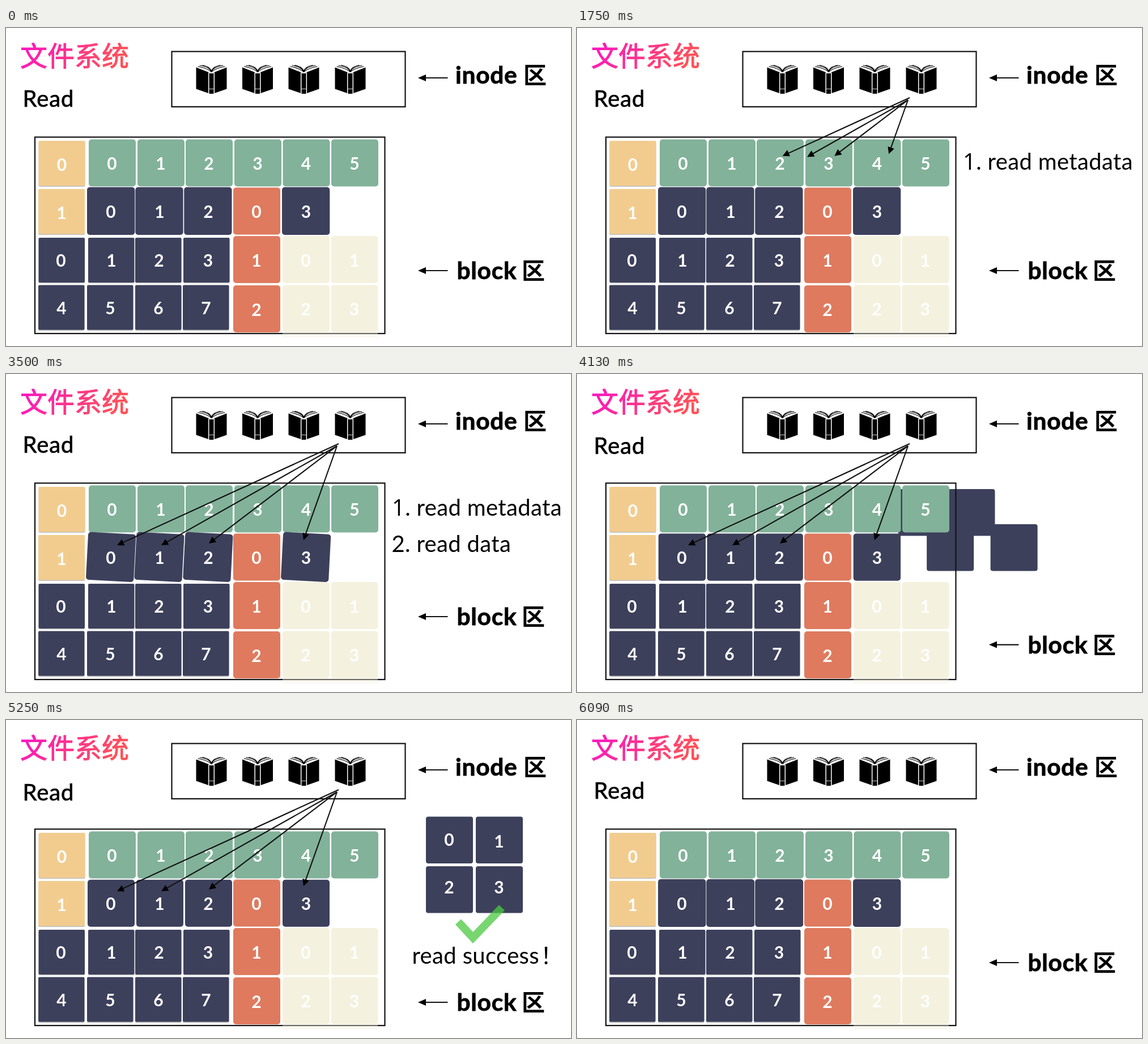
An HTML page that plays this animation: 997x561 px, repeating every 6160 ms.

```html
<!DOCTYPE html>
<html lang="zh-CN">
<head>
<meta charset="utf-8">
<title>文件系统</title>
<style>
html, body { margin: 0; width: 100%; height: 100%; overflow: hidden; background: #fff; }
svg { display: block; width: 100vw; height: 100vh; }
text { font-family: Lato, "Noto Sans CJK SC", sans-serif; }
.note { font-size: 40px; letter-spacing: .35px; }
.one { font-family: "Open Sans", sans-serif; }
.mark { font-family: "Noto Sans CJK JP", "Noto Sans CJK SC", sans-serif; }
.label { font-size: 42.5px; font-weight: 700; letter-spacing: .7px; stroke: #000; stroke-width: .8px; }
.cjk { font-family: "Noto Sans CJK SC", sans-serif; font-size: 41px; font-weight: 700; }
.title { font-family: "Noto Sans CJK SC", sans-serif; font-size: 48px; font-weight: 500; fill: url(#pink); stroke: url(#pink); stroke-width: 1px; }
.digit { font-size: 30px; font-weight: 700; fill: #fff; text-anchor: middle; }
.frame { fill: none; stroke: #111; stroke-width: 2.2px; }
.line { stroke: #111; stroke-width: 2.1px; fill: none; }
</style>
</head>
<body>
<svg viewBox="0 0 997 561" preserveAspectRatio="none">
  <defs>
    <linearGradient id="pink" x1="0" y1="0" x2="1" y2=".25">
      <stop offset="0" stop-color="#fb10cc"/>
      <stop offset="1" stop-color="#ff5058"/>
    </linearGradient>
    <g id="book">
      <path d="M-27-21L-4-12V25L-27 17ZM27-21L4-12V25L27 17ZM-4-10.5H4V25.5H-4Z"/>
      <path d="M-24-22.5Q-8-20 0-13Q8-20 24-22.5M-21-24.5Q-6-23 0-14Q6-23 21-24.5M-16-25Q-4-23 0-15Q4-23 16-25"
        fill="none" stroke="#000" stroke-width="1.2"/>
      <path d="M-4.8-12V25.5M4.8-12V25.5" stroke="#fff" stroke-width="1.5"/>
      <path d="M-4 17H4" stroke="#fff" stroke-width=".8"/>
    </g>
    <g id="pointer">
      <path class="line" d="M738 0H779.500"/>
      <path d="M727 0L741-6V6Z"/>
    </g>
  </defs>

  <text class="title" x="25" y="67">文件系统</text>
  <text id="read" x="29.500" y="138.500" font-size="40" letter-spacing=".9" stroke="#000" stroke-width=".7">Read</text>

  <g id="copies"></g>
  <g id="grid"></g>
  <rect class="frame" x="51" y="192.500" width="617.500" height="346.500"/>
  <rect x="488" y="537" width="168" height="9" fill="#f4f1de" opacity=".4"/>
  <g id="homes"></g>

  <rect class="frame" x="292.500" y="41.500" width="412" height="97.500"/>
  <use href="#book" x="362.500" y="90.500"/>
  <use href="#book" x="444" y="90.500"/>
  <use href="#book" x="525.500" y="90.500"/>
  <use id="jumper" href="#book" x="607.500" y="90.500"/>
  <g id="arrows"></g>

  <use href="#pointer" y="88"/>
  <text class="label" x="793" y="98">inode</text>
  <text class="cjk" x="913" y="98">区</text>
  <g id="block">
    <use href="#pointer" y="428"/>
    <text class="label" x="795.500" y="443">block</text>
    <text class="cjk" x="910" y="443">区</text>
  </g>

  <text id="note1" class="note" x="681" y="250"><tspan class="one">1</tspan>. read metadata</text>
  <text id="note2" class="note" x="680.500" y="314">2. read data</text>
  <text id="done" class="note" x="716.500" y="430">read success<tspan class="mark" x="943">！</tspan></text>
  <path id="check" d="M798 356L824 384L875 331" fill="none" stroke="#4bc841" stroke-width="14"/>
</svg>
<script>
const LOOP = 6160, STEP = 70;
const NAVY = '#3d405b', GREEN = '#82b29a', SAND = '#f2cc8f', RED = '#df7a5e', CREAM = '#f4f1de';
const $ = id => document.getElementById(id);

function add(parent, tag, attrs, text) {
  const el = document.createElementNS('http://www.w3.org/2000/svg', tag);
  for (const k in attrs) el.setAttribute(k, attrs[k]);
  if (text !== undefined) el.textContent = text;
  return parent.appendChild(el);
}
const digit = (parent, n, x, y) => add(parent, 'text', { class: 'digit', x, y: y + 10.5 }, n);

function tile(x, y, w, h, fill, n, dx = w / 2, dy = h / 2, rx = 5) {
  if (rx < 3) add(grid, 'rect', { x, y: y + 1.5, width: w, height: h, rx, fill: '#000', opacity: .25 });
  add(grid, 'rect', { x, y, width: w, height: h, rx, fill });
  digit(grid, n, x + dx, y + dy);
}

const grid = $('grid');
tile(57.5, 199, 82, 79.5, SAND, 0, 41, 42, 2);
tile(57, 284, 82, 79.5, SAND, 1, 41, 42, 2);
[146, 232, 317, 403, 488.5, 574].forEach((x, i) => tile(x, 196.5, 83, 83, GREEN, i, 41, 42.5));
[57.5, 145, 228, 313].forEach((x, i) => tile(x, 370, 81.5, 79, NAVY, i, [39.5, 41, 42, 43.5][i], 40, 2));
[57, 143, 228, 312].forEach((x, i) => tile(x, 453.5, 81.5, 79, NAVY, i + 4, 41, 40.5, 2));
[281.5, 367, 454].forEach((y, i) => tile(401, y, 83, 83, RED, i, 41, 43));
for (let i = 0; i < 4; i++)
  tile(488 + i % 2 * 85.5, i < 2 ? 367 : 453.5, 83, 83, CREAM, i, 41, 43);

// The four data blocks: the ones in the grid and the copies that are read out.
const from = [143, 228.3, 314.2, 487], rest = [144, 230, 316, 488];
const homes = from.map((x, i) => {
  const rect = add($('homes'), 'rect', { rx: 5, fill: NAVY });
  digit($('homes'), i, [185, 271, 357, 529.5][i], 324);
  return rect;
});
const copies = rest.map((x, i) => {
  const g = add($('copies'), 'g', {});
  add(g, 'rect', { width: 83, height: 82.5, rx: 4, fill: NAVY });
  return { g, num: digit(g, i, 41, [41, 43.5, 37, 37][i]) };
});
const arrows = [[587, 123, 196, 302], [584, 127, 274, 302], [584, 127, 358, 299], [584, 127, 525, 293]]
  .map(([x, y, x2, y2]) => ({
    x, y, dx: x2 - x, dy: y2 - y,
    line: add($('arrows'), 'path', { class: 'line' }),
    head: add($('arrows'), 'path', { d: 'M0 0L-12-6V6Z' })
  }));

const ramp = (t, a, b) => Math.min(1, Math.max(0, (t - a) / (b - a)));
const soft = s => (1 - Math.cos(Math.PI * s)) / 2;
const cubic = s => s < .5 ? 4 * s ** 3 : 1 - 4 * (1 - s) ** 3;
const mix = (a, b, p) => a + (b - a) * p;
const fade = (t, a, b, c, d) => soft(ramp(t, a, b)) * (1 - ramp(t, c, d));

function bounce(t) {
  let start = 660;
  for (const [len, high] of [[310, 75], [215, 36], [145, 16]]) {
    const s = (t - start) / len;
    if (s >= 0 && s < 1) return 4 * high * s * (1 - s);
    start += len;
  }
  return 0;
}

function draw(t) {
  const p = cubic(ramp(t, 3720, 4424)) - cubic(ramp(t, 5390, 6120));
  const shake = 3 * Math.cos((t - 3255) / 245 * 2 * Math.PI) * ramp(t, 2600, 2700) * (1 - ramp(t, 3570, 3700));

  $('note1').style.opacity = fade(t, 0, 700, 3700, 3900);
  $('note2').style.opacity = fade(t, 1960, 2620, 3700, 3900);
  $('done').style.opacity = fade(t, 4480, 4900, 5390, 5600);
  $('check').style.opacity = fade(t, 4970, 5390, 5390, 5600);
  $('jumper').setAttribute('transform', `translate(0 ${-bounce(t)})`);
  $('read').setAttribute('transform', `translate(0 ${3.5 * p})`);
  $('block').setAttribute('transform', `translate(0 ${70 * p})`);

  homes.forEach((rect, i) => {
    const x = mix(from[i], rest[i], p), y = mix(280.7, 281.7, p), w = mix(84.3, 83, p);
    for (const [k, v] of Object.entries({ x, y, width: w, height: w })) rect.setAttribute(k, v);
    rect.setAttribute('transform', `rotate(${shake} ${x + w / 2} ${y + w / 2})`);
  });

  $('copies').style.display = p > 0 ? '' : 'none';
  copies.forEach(({ g, num }, i) => {
    const x = mix(rest[i], 741 + i % 2 * 88, p), y = mix(282, i < 2 ? 170.5 : 258, p);
    g.setAttribute('transform', `translate(${x} ${y})`);
    num.style.opacity = fade(t, 4200, 4410, 5390, 5600);
  });

  const grow = ramp(t, 1330, 2062);
  $('arrows').style.opacity = grow > 0 ? 1 - ramp(t, 5390, 5950) : 0;
  for (const { x, y, dx, dy, line, head } of arrows) {
    const tx = x + dx * grow, ty = y + dy * grow, a = Math.atan2(dy, dx);
    line.setAttribute('d', `M${x} ${y}L${tx - 8 * Math.cos(a)} ${ty - 8 * Math.sin(a)}`);
    head.setAttribute('transform', `translate(${tx} ${ty}) rotate(${a * 180 / Math.PI})`);
  }
}

const begin = performance.now();
function tick(now) {
  const t = Math.max(0, now - begin) % LOOP;
  draw(Math.floor(t / STEP) * STEP);
  requestAnimationFrame(tick);
}
draw(0);
requestAnimationFrame(tick);
</script>
</body>
</html>
```
